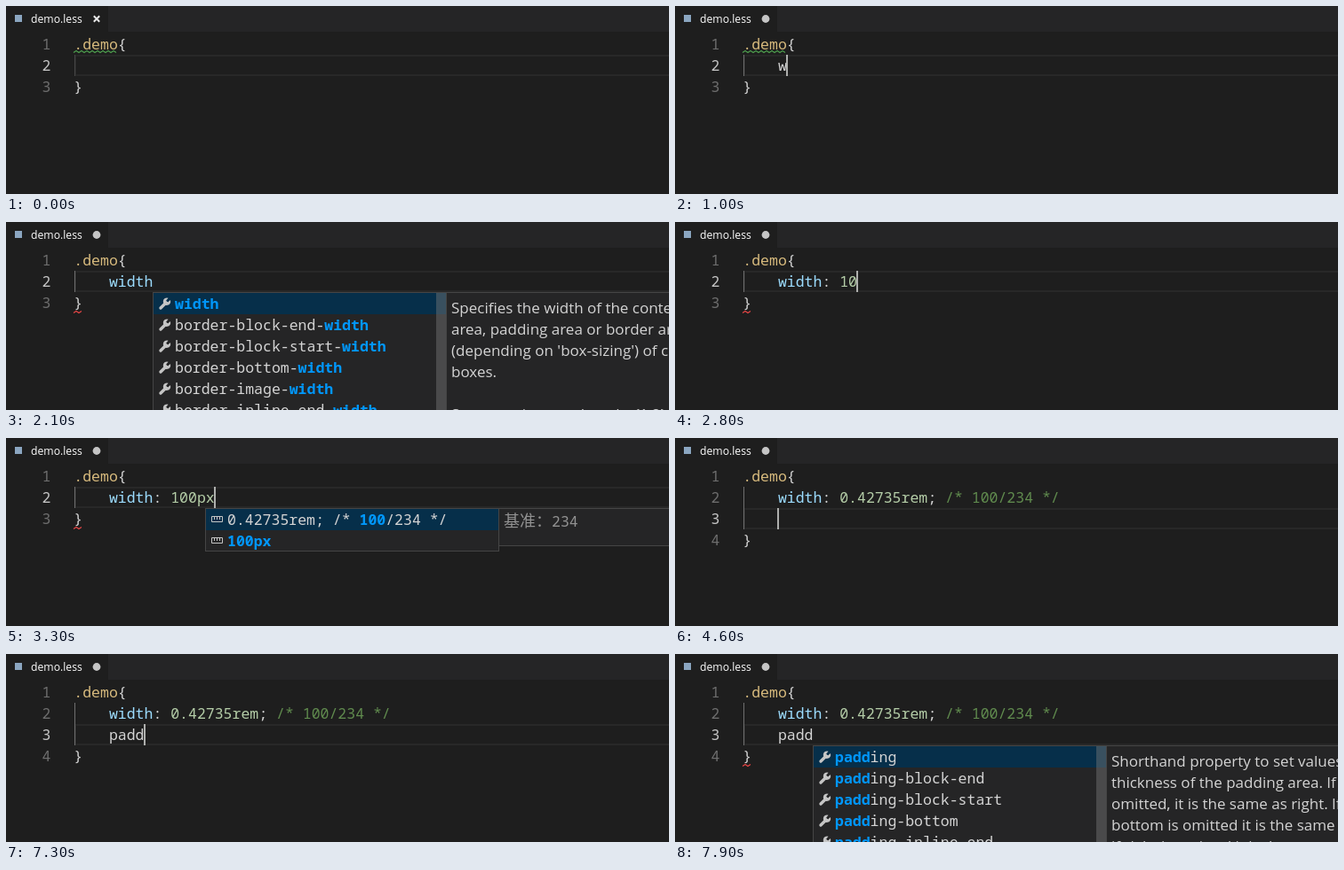
An HTML page that plays this animation: 746x212 px, repeating every 8 s.

```html
<!DOCTYPE html>
<html lang="en">
<head>
<meta charset="utf-8">
<title>Editor completion</title>
<style>
  html, body { margin: 0; width: 100%; height: 100%; overflow: hidden; background: #1e1e1e; }
  svg { display: block; width: 746px; height: 212px; }
  text { white-space: pre; fill: #d4d4d4; font: 16.5px "Noto Sans Mono", monospace; }
  text.ui { font: 17px "Open Sans", sans-serif; }
  text.tab { font: 500 12.2px "Open Sans", sans-serif; fill: #fff; }
  .match { font-weight: 700; fill: #0097fb; }
  .cjk { font: 18px "Noto Sans CJK SC", "Noto Sans CJK", sans-serif; }
</style>
</head>
<body>
<svg id="stage" viewBox="0 0 746 212"></svg>
<script>
const LOOP = 8000, LEFT = 75.6, CHAR = 9.9, ROW = 24, TOP = 31;
const stage = document.getElementById('stage');
const colX = col => LEFT + col * CHAR;
const lineY = n => TOP + (n - 1) * ROW;

const rect = (x, y, w, h, fill, extra = '') =>
  `<rect x="${x}" y="${y}" width="${w}" height="${h}" fill="${fill}" ${extra}/>`;
const label = (x, y, body, extra = '') => `<text x="${x}" y="${y}" ${extra}>${body}</text>`;
const escape = s => s.replace(/&/g, '&amp;').replace(/</g, '&lt;');
const frame = (x, y, w, h) =>
  rect(x + .5, y + .5, w - 1, h - 1, '#252526', 'stroke="#454545"');

// Completion lists and documentation panels
const widths = ['block-end', 'block-start', 'bottom', 'image', 'inline-end'].map(s => `border-${s}-width`);
const paddings = ['', '-block-end', '-block-start', '-bottom', '-inline-end'].map(s => 'padding' + s);
const rem = '0.42735rem; /* 100/234 */';
const dim = 'style="fill:#929292"';

const emmetDoc = { height: 73, draw: (x, y) =>
  label(x, y, 'Emmet Abbreviation', dim) +
  label(x, y + 44, 'widows: <tspan dx="-2.4">|</tspan><tspan dx="-2.4">;</tspan>', 'class="ui"') };
const baseDoc = { height: 43, draw: (x, y) =>
  label(x, y + 1, '<tspan class="cjk">基准：</tspan>234', dim) };
const prose = (...lines) => ({ height: 300, draw: (x, y) =>
  lines.map((s, i) => label(x, y + 3.5 + i * ROW, escape(s), 'class="ui"')).join('') });
const widthDoc = prose('Specifies the width of the content', 'area, padding area or border area',
  "(depending on 'box-sizing') of certain", 'boxes.', '', 'Syntax: <viewport-length>{1,2}');
const paddingDoc = prose('Shorthand property to set values the', 'thickness of the padding area. If left is',
  'omitted, it is the same as right. If', 'bottom is omitted it is the same as top,',
  'if right is omitted it is the same as top.');

const list = (col, match, rows, thumb, doc, icon = 'wrench') => ({ col, match, rows, thumb, doc, icon });
const widList = list(7, 'wid', ['widows: ;', 'widows', 'width', ...widths.slice(0, 3)], 54, emmetDoc);
const widthList = list(9, 'width', ['width', ...widths], 150);
const padList = list(8, 'padd', paddings, 150);
const unitList = (match, rows) => list(15, match, rows, 0, baseDoc, 'ruler');

// Each step overrides the state left by the one before
const typed = (row, text) => ({ [row]: '    ' + text, caret: true });
const steps = [
  [0, { second: '    ', third: null, caret: false, dirty: false, green: true, red: false, popup: null }],
  [500, { caret: true }],
  [900, { caret: false }],
  [1000, { ...typed('second', 'w'), dirty: true }],
  [1100, typed('second', 'wi')],
  [1200, typed('second', 'wid')],
  [1300, { popup: widList }],
  [1400, { ...typed('second', 'widt'), popup: list(7, 'widt', ['width', ...widths], 150) }],
  [1500, { ...typed('second', 'width'), popup: { ...widthList, col: 7 } }],
  [1600, { popup: widthList }],
  [1700, { popup: { ...widthList, doc: widthDoc }, green: false, red: true }],
  [2100, { caret: false }],
  [2200, { ...typed('second', 'width:'), popup: null }],
  [2400, typed('second', 'width: ')],
  [2600, typed('second', 'width: 1')],
  [2800, typed('second', 'width: 10')],
  [2900, typed('second', 'width: 100')],
  [3200, { ...typed('second', 'width: 100p'), popup: unitList('100p', [rem, '100px', '100pc', '100pt']) }],
  [3300, { ...typed('second', 'width: 100px'), popup: unitList('100px', [rem, '100px']) }],
  [3600, { ...typed('second', 'width: ' + rem), popup: null }],
  [4100, { caret: false }],
  [4300, { red: false }],
  [4600, typed('third', '')],
  [5000, { caret: false }],
  [5500, { caret: true }],
  [6000, { caret: false }],
  [6400, { caret: true }],
  [6900, { caret: false }],
  [7000, typed('third', 'p')],
  [7100, typed('third', 'pa')],
  [7200, typed('third', 'pad')],
  [7300, typed('third', 'padd')],
  [7400, { popup: padList }],
  [7500, { popup: { ...padList, doc: paddingDoc }, red: true }],
  [7900, { caret: false }]
];

const tokens = [
  [/^\/\*/, '#608b4e'], [/^\d/, '#b5cea8'], [/^width$/, '#9cdcfe'], [/^(\.demo|p)$/, '#d7ba7d']
];
function code(text) {
  return text.replace(/\/\*.*\*\/|\.?[\w][\w.]*/g, word => {
    const rule = tokens.find(([pattern]) => pattern.test(word));
    return rule ? `<tspan fill="${rule[1]}">${word}</tspan>` : word;
  });
}

function squiggle(x, y, width, color) {
  let d = `M${x} ${y + 2.5}`;
  for (let i = 3; i <= width; i += 3) d += `L${x + i} ${y + (i % 2 ? .5 : 2.5)}`;
  return `<path d="${d}" fill="none" stroke="${color}" stroke-width="1.1"/>`;
}

const icons = {
  wrench: (x, y) => `<g transform="translate(${x} ${y})">
    <path d="M2 12L8 6" stroke="#c5c5c5" stroke-width="3.4" stroke-linecap="round"/>
    <path d="M12.8 2.9L10.4 5.2L8.6 4.8L8.3 3.2L10.6 .8A4.2 4.2 0 1 0 12.8 2.9Z" fill="#c5c5c5"/></g>`,
  ruler: (x, y) => `<path transform="translate(${x} ${y})" fill="none" stroke="#c5c5c5"
    d="M.5 3.5H12.5V9.5H.5ZM3.5 4V7M6.5 4V7M9.5 4V7"/>`
};

function highlight(text, match) {
  const part = text.includes(match) ? match : '100';
  return text.replace(part, `<tspan class="match">${part}</tspan>`);
}

function drawPopup(p, top) {
  const x = Math.round(colX(p.col)), y = top;
  const height = p.thumb ? 290 : p.rows.length * ROW + 1;
  let out = '';
  if (p.doc) out += frame(x + 330, y, 420, p.doc.height) + p.doc.draw(x + 336, y + 20);
  out += frame(x, y, 331, height) + rect(x + 1, y + 1, 329, ROW, '#062f4a');
  p.rows.forEach((row, i) => {
    const rowY = y + 1 + i * ROW;
    out += icons[p.icon](x + 7, rowY + 5) + label(x + 25, rowY + 18, highlight(row, p.match));
  });
  if (p.thumb) out += rect(x + 319, y + 1, 11, p.thumb, '#797979', 'fill-opacity=".45"');
  return out;
}

function draw(s) {
  const added = s.third !== null;
  const lines = ['.demo{', s.second, ...(added ? [s.third] : []), '}'];
  const active = added ? 3 : 2, last = lines.length;
  const y = lineY(active);

  let out = rect(0, 0, 746, 212, '#1e1e1e') + rect(115, 0, 631, 29, '#252526');
  out += rect(10, 10, 8, 8, '#8ba6c1') + label(28, 18.6, 'demo.less', 'class="tab"');
  out += s.dirty
    ? '<circle cx="102" cy="14.5" r="4.4" fill="#c5c5c5"/>'
    : '<path d="M98.8 11.3L105.2 17.7M105.2 11.3L98.8 17.7" stroke="#e8e8e8" stroke-width="2"/>';

  out += rect(78, y + 1, 690, ROW - 2, 'none', 'stroke="#282828" stroke-width="2"');
  out += rect(77, lineY(2), 1, (last - 2) * ROW, s.dirty ? '#707070' : '#484848');
  lines.forEach((text, i) => {
    const base = lineY(i + 1) + 18;
    out += label(40.6, base, i + 1, `style="fill:${i + 1 === active ? '#c6c6c6' : '#6e6e6e'}"`);
    out += label(LEFT + .7, base, code(text));
  });
  if (s.green) out += squiggle(76, 50, 49, '#4d9e4d');
  if (s.red) out += squiggle(76, lineY(last) + 21, 10, '#ea4646');
  if (s.caret) out += rect(Math.round(colX(lines[active - 1].length)), y, 2, ROW, '#aeafad');
  if (s.popup) out += drawPopup(s.popup, y + ROW);
  stage.innerHTML = out;
}

let shown = -1;
function render(now) {
  const t = now % LOOP;
  const count = steps.filter(([at]) => at <= t).length;
  if (count !== shown) {
    shown = count;
    draw(Object.assign({}, ...steps.slice(0, count).map(step => step[1])));
  }
}

const start = performance.now();
function tick() {
  render(performance.now() - start);
  requestAnimationFrame(tick);
}
tick();
</script>
</body>
</html>
```
